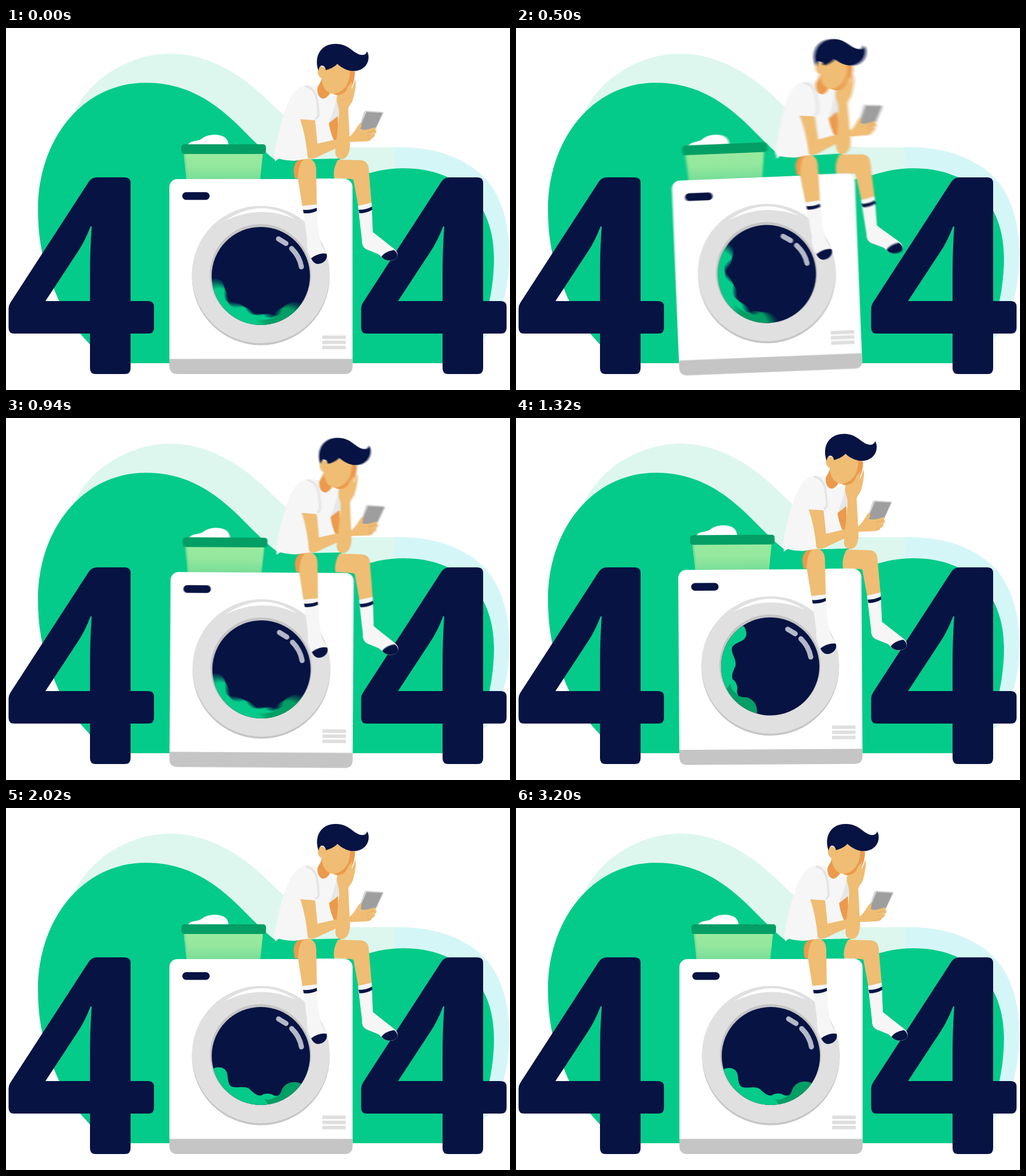
Write an HTML page with a canvas that moves like this. It is 882x635 px and loops after 3240 ms.

```html
<!DOCTYPE html>
<html lang="en">
<head>
<meta charset="utf-8">
<title>404</title>
<style>
  html, body { margin: 0; width: 100%; height: 100%; overflow: hidden; background: #fff; }
  canvas { display: block; }
</style>
</head>
<body>
<canvas id="stage" width="882" height="635" role="img" aria-label="404"></canvas>
<script>
const W = 882, H = 635, LOOP = 3240, STEP = 20;
const SHUTTER = 8, SAMPLES = 8; // motion blur: ms of exposure, pictures averaged
const SPIN = 1.53, SPIN_END = 1800 / SPIN; // drum speed in degrees per ms, five turns
const navy = '#061343', green = '#04cb89', darkGreen = '#039e65', mint = '#ddf7ee', cyan = '#d5f6f7';
const grey = '#c5c5c5', light = '#e0e0e0', skin = '#efbd74', tan = '#ec9a4c', cloth = '#f6f6f6', fold = '#e7e7e7';

const stage = document.getElementById('stage').getContext('2d');
const buffer = document.createElement('canvas');
buffer.width = W;
buffer.height = H;
const c = buffer.getContext('2d');

const tub = c.createLinearGradient(0, 221, 0, 264);
tub.addColorStop(0, '#99ea9f');
tub.addColorStop(.5, '#94e79e');
tub.addColorStop(1, '#7ade97');

// [time, value] pairs
const tilt = [[0, 0], [120, -5.2], [385, 7], [575, -6.6], [790, 7], [1042, -3], [1320, -.36], [1640, 0]];
const lift = [[0, 0], [120, -9.5], [230, -4], [345, -6.7], [460, -3], [562, -4.5], [680, 0],
  [800, -5.5], [940, 6], [1090, 7], [1320, .7], [1640, 0]];

function track(keys, t) {
  const i = keys.findIndex(k => k[0] > t);
  if (i < 0) return keys[keys.length - 1][1];
  const [t0, a] = keys[i - 1], [t1, b] = keys[i];
  const u = (t - t0) / (t1 - t0);
  return a + (b - a) * u * u * (3 - 2 * u);
}

// Steady spin, then a damped swing around the resting angle
function drumAngle(t) {
  if (t < SPIN_END) return SPIN * t;
  const s = (t - SPIN_END) / 1000;
  return 165 * Math.sin(2.5 * Math.PI * s) * Math.exp(-5 * s);
}

const shape = (color, d) => {
  const path = new Path2D(d);
  return () => { c.fillStyle = color; c.fill(path, 'evenodd'); };
};
const line = (color, width, d) => {
  const path = new Path2D(d);
  return () => {
    c.strokeStyle = color;
    c.lineWidth = width;
    c.lineCap = 'round';
    c.stroke(path);
  };
};
const box = (color, x, y, w, h, r) => () => {
  c.fillStyle = color;
  c.beginPath();
  c.roundRect(x, y, w, h, r);
  c.fill();
};
const disc = (color, x, y, r) => () => {
  c.fillStyle = color;
  c.beginPath();
  c.arc(x, y, r, 0, 7);
  c.fill();
};
const draw = list => list.forEach(f => f());

function turned(x, y, degrees, paint) {
  c.save();
  c.translate(x, y);
  c.rotate(degrees * Math.PI / 180);
  c.translate(-x, -y);
  paint();
  c.restore();
}

const hills = [
  shape(cyan, 'M680 209C760 207 815 235 843 269C870 302 881 350 881 395C881 435 875 465 868 485C858 515 845 540 834 546H680Z'),
  shape(mint, 'M120 147C150 85 220 45 288 45C352 45 410 80 455 124C505 172 545 210 610 209H680V300H120Z'),
  shape(green, `M245 96C132 96 56 198 56 318C56 375 66 415 83 455C93 482 108 510 130 536C150 560 170 580 195 588H800
    C835 540 854 470 854 403C854 308 795 246 695 246C640 246 615 267 570 267C510 267 470 234 440 204
    C400 166 346 96 245 96Z`)
];

const four = shape(navy, `M159 262H208Q218 262 218 272V479H249Q259 479 259 489V526Q259 536 249 536H218V597
  Q218 607 208 607H157Q147 607 147 597V536H14Q4.500 536 4.500 526V492Q4.500 487 7.500 482L145 269.500Q150 262 159 262Z
  M147 479V430Q147 390 150 348H148Q138 374 126 392L69 479Z`);

const body = [
  shape('#fff', 'M318 205C324 196 335 200 343 194C352 186 372 185 382 191C388 195 389 200 390 206Z'),
  shape(tub, 'M311 218H450L445 265H316Z'),
  shape('#7ade97', 'M311 220H314L319 265H316Z'),
  box(darkGreen, 307, 204, 148, 17, 5),
  box('#fff', 286, 265, 320.5, 342, 14),
  shape(grey, 'M286 580.5H606.5V593Q606.5 607 592.5 607H300Q286 607 286 593Z'),
  box(navy, 308.5, 288, 48, 13.5, 6.75),
  ...[539.5, 548.5, 557.5].map(y => box('#dedede', 553.5, y, 41, 6, 0)),
  disc(grey, 446, 436, 120.5),
  disc(light, 446, 432.5, 120.5),
  shape('#fff', 'M382 339Q446 295 507 336Q446 308 382 339Z'),
  disc(grey, 445.5, 432.5, 88.5),
  disc(navy, 446, 435, 86)
];

const laundry = [
  shape(green, `M355 464C366 452 386 453 388 469C390 483 390 490 402 490.500C410 491 419 488 427 493
    C433 499 440 505 447 504.500C453 500 460 500 466 502Q473 507 482 502L490 530H355Z`),
  shape(darkGreen, 'M453 510.500Q463 513 470 508L476 505C484 500 482 493 487 488C494 480 507 476 522 485L514 532H448L459 518Z')
];

const shine = [
  line('#b4b8c7', 9, 'M477 370L490 378'),
  line('#b4b8c7', 9, 'M500 387Q514 401 517 419')
];

const person = [
  // shorts and far leg
  shape(green, 'M472 229L505 231L585 229L575 264L478 264Q472 247 472 229Z'),
  shape(skin, 'M581 231L618 232C630 232 635 238 635 250L640 309L617 315L608 266C596 263 582 265 574 263Q572 246 581 231Z'),
  shape(cloth, 'M616 312L640 306.500L642 358L680 388Q688 395 684 402Q680 409 668 408Q660 405 652 397L630 388Q622 383 623 372Z'),
  shape(navy, 'M617 319Q630 319 640.500 313.500L641 319Q631 325 618.500 325Z'),
  shape(navy, 'M657 401Q664 392 679 389.500Q686 394 685 402Q681 409 668 408Q660 406 657 401Z'),
  line('rgba(255,255,255,.3)', .7, 'M657 401Q660 406 668 408Q681 409 685 402Q686 394 679 389.500'),
  // near leg
  shape(tan, 'M524 229C505 229 500 245 506 264H516L520 240Z'),
  shape(skin, 'M511 264C512 238 518 229 528 229C540 230 544 240 543 255L544 314H519Z'),
  shape(cloth, 'M519 312L544 309.500C545 340 546 362 552 380L560 395Q561 412 546 413Q539 412 536 407C527 394 526 384 527 372Z'),
  shape(navy, 'M520 319Q533 320 544 315.500V321Q534 326 521 325Z'),
  shape(navy, 'M534 404C542 398 552 394 561 396C564 405 556 414 545 414Q538 413 534 404Z'),
  // trunk
  shape(tan, 'M565 166L581 153V196L574 198Q567 181 565 166Z'),
  shape(cloth, `M515 104C524 99 537 99 546 104L560 122L578 118C584 134 583 146 580 154L565 167
    Q567 184 574 197L530 229L505 233Q484 232 478 229L471 234V227L469 225C479 167 494 115 515 104Z`),
  shape(fold, 'M579 121C585 136 584 148 582 154L565 167Q575 145 579 121Z'),
  shape(tan, 'M553 87C551 98 545 101 545 108C545 118 550 124 556 124Q563 122 567 115Z'),
  line('#e4e4e4', 3.5, 'M526 103C543 106 546 124 547 154L543 159'),
  // phone and near arm
  shape('#d5d5d5', 'M630 145L659 147Q662 148 660 151L645 181L617 177L627 147Z'),
  shape('#9e9e9e', 'M631 147.500L659 149L645 181L618 178Z'),
  shape(skin, `M515 160L541 162Q544 190 545 203L602 190C611 183 615 171 621 166Q624 170 620 179
    Q634 179 646 174Q650 177 644 180L632 184L647 179Q651 182 645 186L633 189L644 185Q648 188 643 192
    L633 195Q641 192 640 195Q637 199 628 199L602 200L552 223C538 231 530 231 528 226Q525 190 515 160Z`),
  line('#dfa45f', .8, 'M632 184L645 180M633 189L645 186M633 195L642 192'),
  // head
  shape(skin, 'M558 72L581 62L610 76C609 92 604 104 596 111C585 120 566 118 558 107C553 99 552 90 552 82Z'),
  shape(tan, 'M602 75L611 77C610 98 603 112 592 117Q582 120 573 116C594 112 603 95 602 75Z'),
  shape(skin, 'M559 71Q552 64 547 70C544 78 547 88 554 88L561 84Z'),
  shape(navy, `M547 75C538 48 553 28 576 28C599 27 606 43 620 47Q630 49 632 41C637 49 635 61 628 68
    C614 81 594 76 580 63C573 70 566 72 560 74Q558 65 552 66Q548 68 547 75Z`),
  // supporting arm
  shape(skin, `M611 91C614 96 611 112 608 123C606 132 600 136 599 142L602 205C602 222 595 231 586 230
    C578 229 575 221 577 212L583 150C584 138 576 128 580 118C590 117 596 112 599 102L606 94L605 108Q609 99 611 91Z`)
];

function scene(t) {
  c.fillStyle = '#fff';
  c.fillRect(0, 0, W, H);
  draw(hills);
  four();
  c.save();
  c.translate(617, 0);
  four();
  c.restore();

  c.save();
  c.translate(0, track(lift, t));
  turned(446, 607, track(tilt, t), () => {
    draw(body);
    c.save();
    c.beginPath();
    c.arc(446, 435, 86, 0, 7);
    c.clip();
    turned(446, 435, drumAngle(t), () => draw(laundry));
    c.restore();
    draw(shine);
    draw(person);
  });
  c.restore();
}

function frame() {
  const t = Math.floor(performance.now() % LOOP / STEP) * STEP;
  for (let i = 0; i < SAMPLES; i++) {
    scene(t + SHUTTER * i / (SAMPLES - 1));
    stage.globalAlpha = 1 / (i + 1);
    stage.drawImage(buffer, 0, 0);
  }
  requestAnimationFrame(frame);
}
frame();
</script>
</body>
</html>
```
